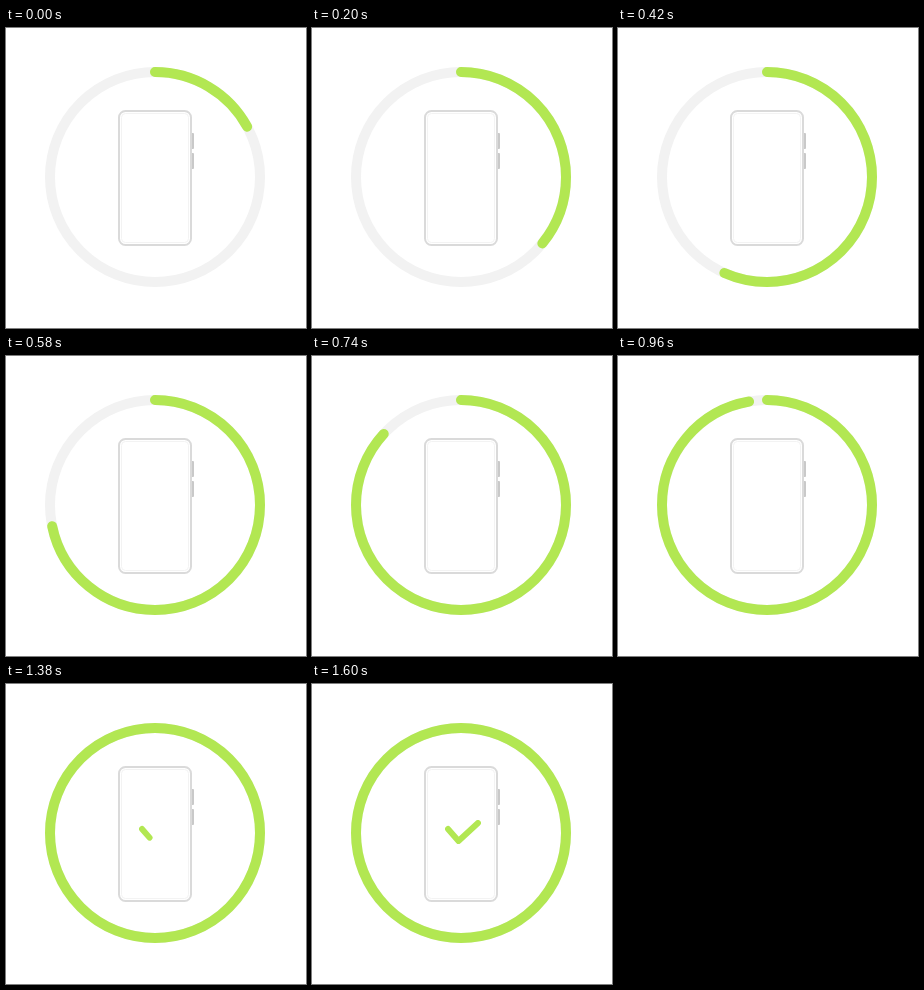
Animation, 300 px wide and 300 px high, one loop 1.82 s. Source, as an HTML page:

```html
<!DOCTYPE html>
<html lang="en">
<head>
<meta charset="utf-8">
<title>Phone progress</title>
<style>
  html, body { margin: 0; width: 100%; height: 100%; overflow: hidden; background: #fff; }
  svg { display: block; width: 100vw; height: 100vh; fill: none; }
  .track, .bar { stroke-width: 10; }
  .track { stroke: #f2f2f2; }
  .bar, .check { stroke: #b2e752; stroke-linecap: round; stroke-linejoin: round; }
  .bar { stroke-dasharray: 360 720; animation: fill 1820ms linear infinite; }
  .check { stroke-width: 6; stroke-dasharray: 100 200; animation: draw 1820ms linear infinite; }

  /* steady sweep, then a soft landing */
  @keyframes fill {
    0% { stroke-dashoffset: 299; }
    40.659% { stroke-dashoffset: 47.7; animation-timing-function: cubic-bezier(.2, .65, .6, 1); }
    65.934%, 100% { stroke-dashoffset: 0; }
  }
  @keyframes draw {
    0%, 71.42% { stroke-dashoffset: 100; opacity: 0; }
    71.429% { stroke-dashoffset: 100; opacity: 1; }
    87.912%, 100% { stroke-dashoffset: 0; opacity: 1; }
  }
</style>
</head>
<body>
<svg viewBox="0 0 300 300">
  <circle class="track" cx="149" cy="149" r="105"/>
  <circle class="bar" cx="149" cy="149" r="105" pathLength="360" transform="rotate(-90 149 149)"/>
  <g fill="#c9c9c9">
    <rect x="185" y="105" width="3" height="16" rx="1"/>
    <rect x="185" y="125" width="3" height="16" rx="1"/>
  </g>
  <rect x="113" y="83" width="72" height="134" rx="6.5" fill="#fff" stroke="#dadada" stroke-width="2"/>
  <rect x="115.5" y="85.5" width="67" height="129" rx="4" stroke="#f3f3f3"/>
  <path class="check" d="M136 145L146.5 157L166 139" pathLength="100"/>
</svg>
</body>
</html>
```
